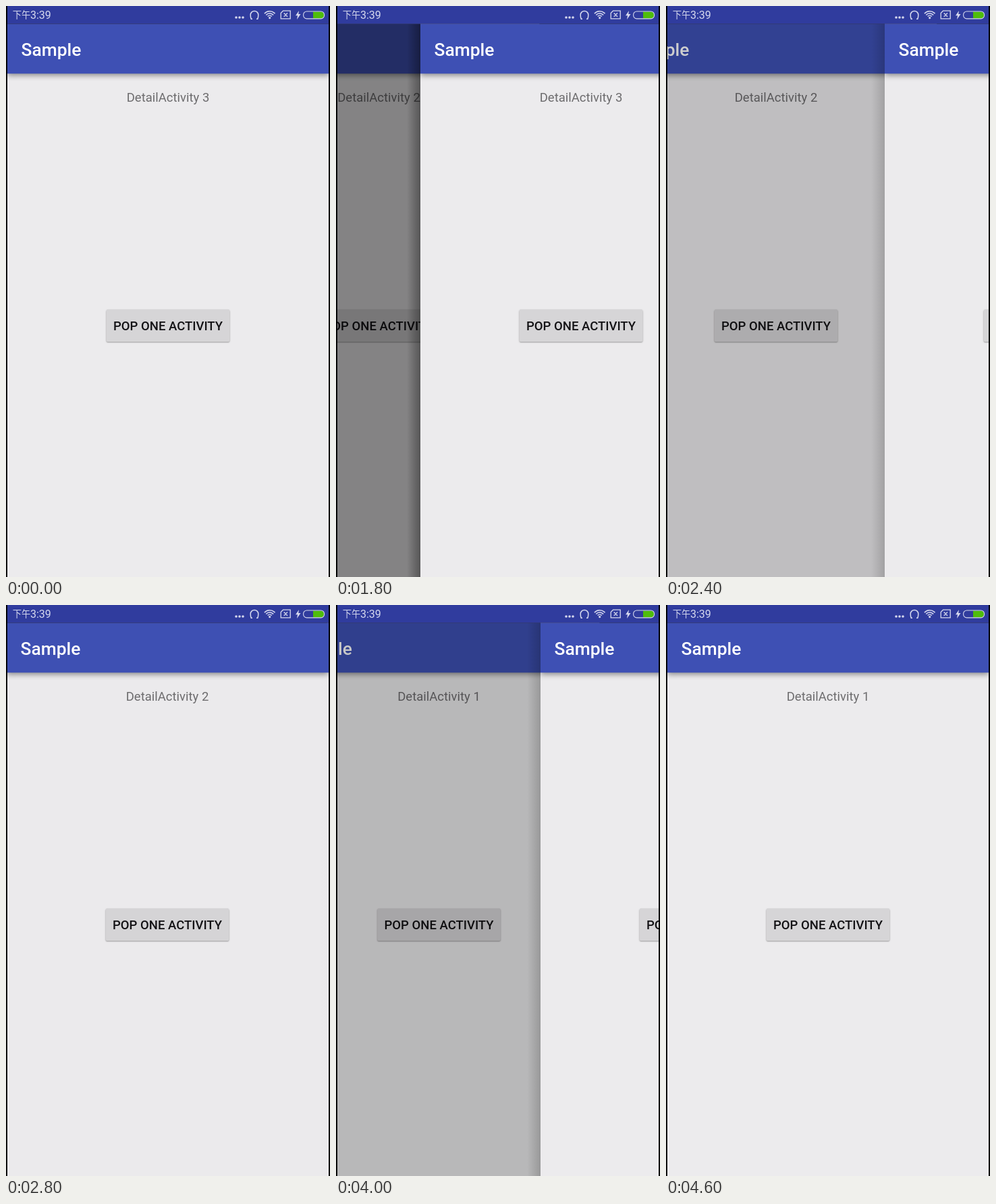
An HTML page with a canvas that plays this animation: 480 px wide and 847 px high, repeating every 5000 ms.

```html
<!DOCTYPE html>
<html lang="en">
<head>
<meta charset="utf-8">
<title>Swipe back</title>
<style>
  html, body { margin: 0; width: 100%; height: 100%; overflow: hidden; background: #000; }
  canvas { display: block; }
</style>
</head>
<body>
<canvas id="stage" width="480" height="847"></canvas>
<script>
const ctx = document.getElementById('stage').getContext('2d');
const LEFT = 2, WIDTH = 476, TOP = 26.5, BOTTOM = 847;
const LOOP = 5000, TICK = 200;
const ROBOTO = 'Roboto, sans-serif';

// Each swipe: start time, screen being dragged away, its offset at each tick.
const swipes = [
  { start: 1400, page: 3, offsets: [10, 58, 123, 195, 262, 322, 432, 474] },
  { start: 3600, page: 2, offsets: [38.5, 160, 301, 425, 473] }
];

function label(text, x, y, font, color, align = 'left') {
  ctx.font = font;
  ctx.fillStyle = color;
  ctx.textAlign = align;
  ctx.fillText(text, x, y);
}

function withShadow(alpha, dy, blur, draw) {
  ctx.save();
  ctx.shadowColor = `rgba(0,0,0,${alpha})`;
  ctx.shadowOffsetY = dy;
  ctx.shadowBlur = blur;
  draw();
  ctx.restore();
}

function box(x, y, w, h, r) {
  ctx.beginPath();
  ctx.roundRect(x, y, w, h, r);
}

function drawScreen(page, offset) {
  ctx.save();
  ctx.translate(offset, 0);
  ctx.beginPath();
  ctx.rect(LEFT, TOP, WIDTH, BOTTOM - TOP);
  ctx.clip();

  ctx.fillStyle = '#ecebed';
  ctx.fillRect(LEFT, TOP, WIDTH, BOTTOM - TOP);
  withShadow(0.42, 3, 8, () => {
    ctx.fillStyle = '#3e50b4';
    ctx.fillRect(LEFT, TOP, WIDTH, 100.3 - TOP);
  });
  label('Sample', 22.5, 74, `500 26.4px ${ROBOTO}`, '#fff');
  label(`DetailActivity ${page}`, 240, 141.7, `18.5px ${ROBOTO}`, '#6d6c6e', 'center');

  withShadow(0.35, 1, 2, () => {
    ctx.fillStyle = '#d6d5d7';
    box(148.7, 450, 182.6, 48, 2.6);
    ctx.fill();
  });
  label('POP ONE ACTIVITY', 240, 481.2, `500 18.5px ${ROBOTO}`, '#131215', 'center');
  ctx.restore();
}

function drawSwipe(page, offset) {
  const remaining = 1 - offset / WIDTH;
  const edge = LEFT + offset;
  drawScreen(page - 1, -remaining * WIDTH / 2);

  ctx.fillStyle = `rgba(0,0,0,${0.6 * remaining})`;
  ctx.fillRect(LEFT, TOP, offset, BOTTOM - TOP);
  const shade = ctx.createLinearGradient(edge - 20, 0, edge, 0);
  shade.addColorStop(0, 'rgba(0,0,0,0)');
  shade.addColorStop(1, `rgba(0,0,0,${0.47 * remaining})`);
  ctx.fillStyle = shade;
  ctx.fillRect(edge - 20, TOP, 20, BOTTOM - TOP);

  drawScreen(page, offset);
}

function stroke(path, width) {
  ctx.lineWidth = width;
  ctx.stroke(new Path2D(path));
}

function drawStatusBar() {
  const ink = '#d6d9ee';
  ctx.fillStyle = '#303c9e';
  ctx.fillRect(LEFT, 0, WIDTH, TOP);
  label('下午', 9.7, 18.3, '13.3px "Noto Sans CJK SC", "Noto Sans CJK", sans-serif', ink);
  label('3:39', 36, 18.6, `16px ${ROBOTO}`, ink);

  for (const x of [341, 346, 351]) {
    ctx.beginPath();
    ctx.arc(x, 17, 1.8, 0, 7);
    ctx.fill();
  }

  ctx.strokeStyle = ink;
  // Headphones
  stroke('M365 19.2H363.2Q362.2 17 362.2 13.2A5.8 5.8 0 0 1 373.8 13.2Q373.8 17 372.8 19.2H371', 1.5);
  // Wi-Fi
  for (const r of [4, 7.2, 10.4]) {
    ctx.lineWidth = 1.6;
    ctx.beginPath();
    ctx.arc(390.7, 18.2, r, -Math.PI * 0.77, -Math.PI * 0.23);
    ctx.stroke();
  }
  ctx.beginPath();
  ctx.arc(390.7, 17.6, 1.6, 0, 7);
  ctx.fill();
  // Missing SIM
  stroke('M410.5 7.2H421.2V18.8H407.2V10.5ZM411.7 10.5L417 15.8M417 10.5L411.7 15.8', 1.3);
  // Charging bolt
  ctx.fill(new Path2D('M434 7L429 14.2H432L431 20L436.5 12H433.2Z'));
  // Battery
  ctx.fillStyle = '#4fbd0c';
  box(455, 8.5, 16, 10, [0, 4.5, 4.5, 0]);
  ctx.fill();
  ctx.lineWidth = 1.1;
  box(440.6, 8, 30.9, 10.9, 5);
  ctx.stroke();
}

function render(now) {
  const time = now % LOOP;
  const swipe = swipes.findLast(s => time >= s.start);
  ctx.fillStyle = '#000';
  ctx.fillRect(0, 0, 480, 847);

  ctx.save();
  ctx.beginPath();
  ctx.rect(LEFT, 0, WIDTH, BOTTOM);
  ctx.clip();
  if (!swipe) {
    drawScreen(3, 0);
  } else {
    const offset = swipe.offsets[Math.floor((time - swipe.start) / TICK)];
    if (offset === undefined) drawScreen(swipe.page - 1, 0);
    else drawSwipe(swipe.page, offset);
  }
  drawStatusBar();
  ctx.restore();
  requestAnimationFrame(frame);
}

const began = performance.now();
function frame() {
  render(performance.now() - began);
}
frame();
</script>
</body>
</html>
```
